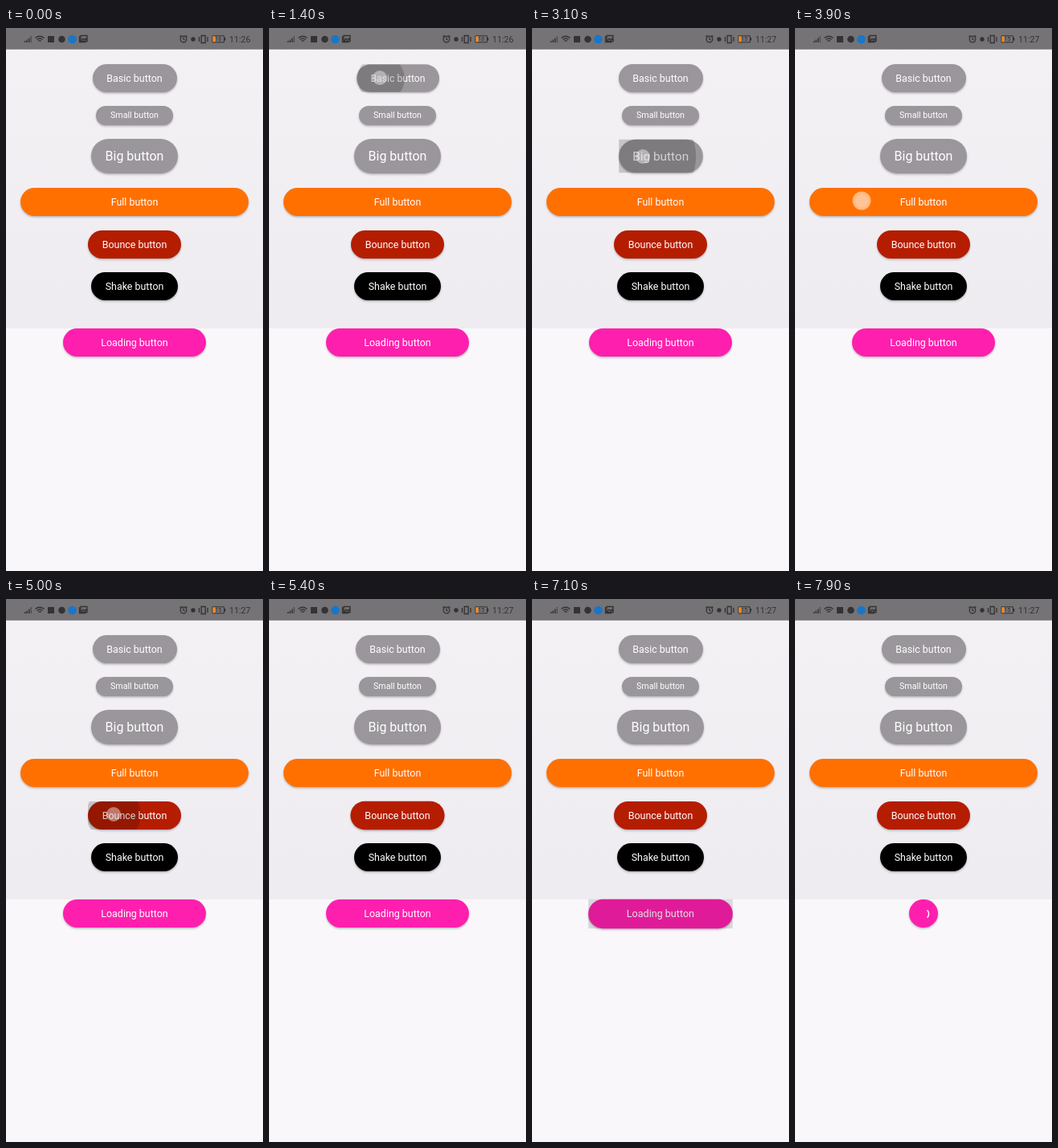
Recreate the animation shown at these times as an HTML page. Size 320 px wide and 676 px high, loop 8000 ms.

```html
<!DOCTYPE html>
<html lang="en">
<head>
<meta charset="utf-8">
<title>Buttons</title>
<style>
  html, body { margin: 0; width: 100%; height: 100%; overflow: hidden; }
  body {
    position: relative; font-family: Roboto, sans-serif;
    background: linear-gradient(#f4f1f5, #efecf1) 0 27px / 100% 347px no-repeat, #faf7fb;
  }
  #bar { position: absolute; left: 0; top: 0; }
  .btn {
    position: absolute; color: #fff; text-align: center; white-space: nowrap;
    border-radius: 30px; box-shadow: 0 1.5px 2.5px rgba(0, 0, 0, .27);
  }
  .clip { position: absolute; inset: 0; overflow: hidden; }
  .ripple { position: absolute; border-radius: 50%; background: rgba(0, 0, 0, .18); }
  #dot {
    position: absolute; width: 18px; height: 18px; margin: -9px; border-radius: 50%;
    background: rgba(255, 255, 255, .42);
  }
  #dot.new {
    background: rgba(255, 255, 255, .58);
    box-shadow: 0 0 0 1.5px rgba(255, 255, 255, .15), 0 0 0 2.5px rgba(255, 255, 255, .45);
  }
  #spin { position: absolute; left: 150px; top: 382px; }
</style>
</head>
<body>
<svg id="bar" width="320" height="27" fill="#333" font-family="Roboto, sans-serif">
  <rect width="320" height="26.7" fill="#757376"/>
  <path d="M23 16h1.5v2H23zM25.5 14.5H27V18h-1.500zM28 12.500h1.500V18H28z"/>
  <path d="M30.500 10H32v8h-1.500z" opacity=".55"/>
  <g fill="none" stroke="#333" stroke-width="1.300">
    <path d="M36.500 12.500q5.500-4.500 11 0M38.500 14.500q3.500-3 7 0M40.300 16.400q1.700-1.500 3.400 0"/>
    <path d="M91.500 10v7.500h8M93 9.500h8v7h-8zM93.500 16l2.500-3 2 2 1.500-2 1.500 3"/>
    <circle cx="221" cy="14" r="3.800"/>
    <path d="M221 11.500V14l1.800 1M216.500 11l2-1.800M225.500 11l-2-1.800"/>
    <path d="M243.200 9.500h5v9h-5zM240.500 11v6M251 11v6"/>
    <path d="M257 9.800h14.500v8H257z" stroke-width="1"/>
  </g>
  <rect x="52" y="10" width="8" height="8"/>
  <circle cx="69.500" cy="14" r="4.300"/>
  <circle cx="82.500" cy="14" r="5.300" fill="#1976c8"/>
  <circle cx="233" cy="14" r="2.700"/>
  <rect x="257.500" y="10.300" width="3" height="7" fill="#ff8a1c"/>
  <rect x="272" y="12" width="1.300" height="3.500"/>
  <text id="level" x="260.300" y="16.400" font-size="7.200"></text>
  <text id="clock" x="278" y="17.600" font-size="10.600"></text>
</svg>
<script>
const LOOP = 8000, MID = 160;
const $ = id => document.getElementById(id);
const clamp = v => Math.max(0, Math.min(1, v));

// values spaced 100 ms apart; the last one holds
const at = (keys, u) => {
  const p = Math.max(0, Math.min(keys.length - 1, u / 100)), i = Math.floor(p);
  const a = keys[i], b = keys[i + 1] ?? a;
  return a + (b - a) * (p - i);
};

const add = (parent, cls) => {
  const el = document.createElement('div');
  el.className = cls;
  parent.append(el);
  return el;
};

const TAP = [1, .98, .96, .98, 1];
const buttons = [
  { text: 'Basic', y: 62, w: 105, h: 35, color: '#9a969b',
    start: 1300, x: 138, speed: .3, up: 250, scale: TAP },
  { text: 'Small', y: 108.8, w: 96, h: 24, size: 10.67, color: '#9a969b',
    start: 2100, x: 141, dy: 2, wait: 100, speed: .29, up: 250, scale: TAP },
  { text: 'Big', y: 159.7, w: 108.5, h: 43, size: 16, color: '#9a969b',
    start: 2900, x: 138, speed: .34, up: 250, scale: [1, 1, .96, .97, 1.01, 1] },
  { text: 'Full', y: 216.3, w: 284.4, h: 35, color: '#ff7000',
    start: 3900, x: 83, dy: -1, speed: .5, up: 350, scale: [1, 1, .97, .96, .98, 1.005, 1] },
  { text: 'Bounce', y: 269, w: 116, h: 35, color: '#b51d00',
    start: 4900, x: 134, dy: -1, speed: .34, up: 250, scale: [1, 1, .96, .96, .98, 1.01, 1.005, 1] },
  { text: 'Shake', y: 321.5, w: 108.5, h: 35, color: '#000',
    start: 5800, x: 138, speed: .34, up: 250, scale: [1, 1, .98, 1],
    turn: [0, 0, 0, -1.6, 1.5, -1.3, .7, 0] },
  { text: 'Loading', y: 391.7, w: 177.8, h: 35.5, color: '#ff1fae',
    start: 6800, x: 135, speed: .4, up: 250, scale: [1, 1, .98, 1.01, 1] }
];

for (const b of buttons) {
  const el = b.el = add(document.body, 'btn');
  b.label = document.createElement('span');
  b.label.textContent = b.text + ' button';
  el.append(b.label);
  b.ripple = add(add(el, 'clip'), 'ripple');
  Object.assign(el.style, {
    left: MID - b.w / 2 + 'px', top: b.y - b.h / 2 + 'px',
    width: b.w + 'px', height: b.h + 'px',
    font: `${b.size || 12.44}px/${b.h}px Roboto, sans-serif`, background: b.color
  });
}
const loading = buttons[buttons.length - 1];

document.body.insertAdjacentHTML('beforeend', `
  <svg id="spin" width="20" height="20" fill="none" stroke="#fff" stroke-width="1.400">
    <path d="M14.600 5.200A6.600 6.600 0 0 1 14.600 14.800"/>
  </svg>
  <div id="dot"></div>`);
const dot = $('dot'), spin = $('spin');

function drawButton(b, t) {
  const u = t - b.start;
  b.el.style.transform = `rotate(${at(b.turn || [0], u)}deg) scale(${at(b.scale, u)})`;

  const r = Math.max(0, (u - (b.wait || 0)) * b.speed);
  const cx = b.x - MID + b.w / 2, cy = b.h / 2 + (b.dy || 0);
  Object.assign(b.ripple.style, {
    left: cx - r + 'px', top: cy - r + 'px', width: 2 * r + 'px', height: 2 * r + 'px',
    opacity: 1 - clamp((u - b.up) / 150)
  });

  if (u >= 0 && u < b.up) {
    dot.hidden = false;
    dot.className = u < 100 ? 'new' : '';
    dot.style.left = b.x + 'px';
    dot.style.top = b.y + (b.dy || 0) + 'px';
  }
}

function drawLoading(t) {
  const u = t - loading.start, k = clamp((u - 300) / 500);
  const w = loading.w + (loading.h - loading.w) * k * k * (3 - 2 * k);
  loading.el.style.width = w + 'px';
  loading.el.style.left = MID - w / 2 + 'px';
  loading.label.style.visibility = k > 0 ? 'hidden' : 'visible';
  spin.style.opacity = k > 0 ? 1 : 0;
  spin.style.transform = `rotate(${(u - 1100) * .6}deg)`;
}

function frame(now) {
  const t = Math.floor(now % LOOP / 100) * 100;
  $('clock').textContent = t < 2200 ? '11:26' : '11:27';
  $('level').textContent = t < 2700 ? '16' : '15';
  dot.hidden = true;
  for (const b of buttons) drawButton(b, t);
  drawLoading(t);
  requestAnimationFrame(frame);
}
requestAnimationFrame(frame);
</script>
</body>
</html>
```
